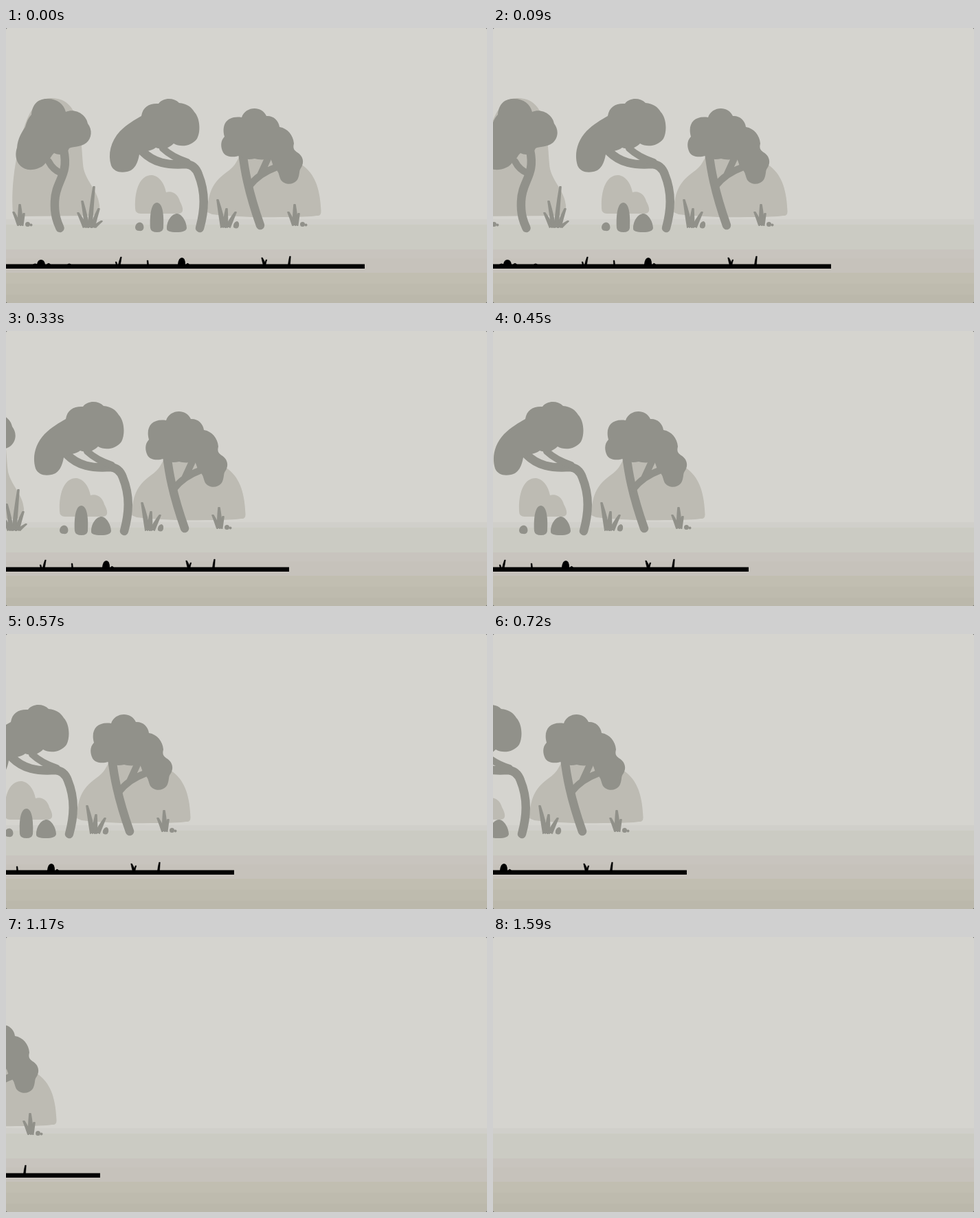
These frames come from a looping animation (700x400 px, 1.86 s). An HTML page with a canvas:

```html
<!DOCTYPE html>
<html lang="en">
<head>
<meta charset="utf-8">
<title>Forest scroll</title>
<style>
html, body { margin: 0; width: 100%; height: 100%; overflow: hidden; background: #444; }
canvas { display: block; width: 700px; height: 400px; border-radius: 2px; }
</style>
</head>
<body>
<canvas width="700" height="400"></canvas>
<script>
const canvas = document.querySelector('canvas');
const ctx = canvas.getContext('2d');
const LOOP = 1860, STEP = 30, STEPS = 53;
const HILL = '#bdbbb3', TREE = '#91918a', GROUND = '#000';

// [top, colour]
const bands = [
  [0, '#d5d4cf'], [278, '#d0cfca'], [286, '#cbcbc3'], [322, '#c8c4be'],
  [335, '#c6c2bb'], [356, '#c1beb1'], [372, '#bebbae'], [388, '#bbb8ab']
];

const hills = new Path2D(`
  M10 268C7 230 14 190 22 160C30 128 42 102 65 102C85 102 96 112 102 130
  C112 165 110 185 113 205C118 225 134 237 136 258Q137 272 126 273L16 274Q10 274 10 268Z
  M188 262C187 235 195 214 212 214C224 215 231 228 233 239C244 236 251 244 253 252
  Q258 261 257 266Q256 270 250 270L196 270Q188 270 188 262Z
  M293 268C294 235 304 222 322 209C332 202 335 196 340 186C360 170 400 180 432 200
  C448 212 457 230 458.500 266Q459 274 452 273Q440 275 400 275C360 276 330 274 300 271Z`);

const crowns = new Path2D(`
  M37 126C38 112 46 103 59 103C73 102 84 110 87 122C102 116 117 127 119 139
  C126 148 125 160 117 167C108 174 97 172 92 175C88 184 78 186 70 182C65 186 66 190 59 194
  C55 203 42 207 32 206C18 203 11 190 16 174C17 160 24 150 28 144C30 136 33 130 37 126Z
  M153 200C148 184 152 165 166 150C176 140 188 133 197 128C199 114 210 109 222 110
  C229 101 244 101 252 109C263 110 270 115 274 122C282 130 284 150 278 161
  C270 172 254 174 244 168C237 175 228 178 218 174C210 180 202 178 194 184
  C192 195 188 207 176 209C166 211 157 209 153 200Z
  M318 158C313 140 322 127 343 130C348 114 372 112 379 128C388 127 397 134 398 144
  C410 146 418 156 419 168C417 176 420 178 424 181C432 186 435 195 429 204
  C426 207 428 216 423 222C417 229 405 228 400 221C397 215 398 211 393 206
  C388 203 388 194 384 189C376 193 366 191 362 190C352 192 345 191 341 185
  C332 189 320 188 316 181C312 173 312 164 318 158Z`);

const trunks = new Path2D(`
  M84 178C92 215 72 222 71 252C70 272 75 283 78.500 291
  M199 180C215 196 235 200 262 198Q275 199 280 213C291 240 289 265 282 291
  M344 180C347 205 352 236 370 287`);
const branches = new Path2D(`
  M62 194Q68 206 80 211M228 175Q242 188 264 195
  M355 229Q368 212 392 203M370 214L381 190`);

const stones = new Path2D(`
  M188 290C189 281 200 280 200.500 290Q200 296 194 295Q188 295 188 290Z
  M210 291C209 272 211 254 220 254C229 255 230 275 229 291Q228 297 220 297Q211 297 210 291Z
  M234 292C234 279 242 270 249 270C257 271 263 283 263 291Q262 297 248 297Q234 297 234 292Z
  M331 290Q330 283 336 281Q340 282 339 288Q337 294 331 290Z`);

const bumps = new Path2D(`
  M45 344Q46 337 51 337Q56 337 57 344ZM39 344Q42 341 46 344ZM59 344Q62 340 65 344Z
  M89 344Q92 341 95 344ZM250 344Q251 334 256 334Q261 334 261 344ZM262 344Q264 340 267 344Z`);

function fill(colour, shape) {
  ctx.fillStyle = colour;
  ctx.fill(shape);
}

function stroke(width, shape) {
  ctx.lineWidth = width;
  ctx.stroke(shape);
}

// Leaf from a base point to a tip, widest in the lower half
function blade(x, y, tipX, tipY, w) {
  const midY = y + (tipY - y) * 0.45;
  const midX = x + (tipX - x) * 0.35;
  ctx.beginPath();
  ctx.moveTo(x - w / 2, y);
  ctx.quadraticCurveTo(midX - w / 2, midY, tipX - 0.8, tipY);
  ctx.lineTo(tipX + 0.8, tipY);
  ctx.quadraticCurveTo(midX + w / 2, midY, x + w / 2, y);
  ctx.fill();
  ctx.stroke();
}

function dot(x, y, r) {
  ctx.beginPath();
  ctx.arc(x, y, r, 0, 7);
  ctx.fill();
}

function smallTuft(x) {
  blade(x - 1, 287, x - 9, 268, 4);
  blade(x + 1, 287, x, 257, 6);
  blade(x + 3, 287, x + 6, 270, 3);
  dot(x + 11.5, 285.500, 3.500);
  dot(x + 16.5, 286.500, 2);
}

function drawScene() {
  fill(HILL, hills);
  ctx.strokeStyle = TREE;
  ctx.lineCap = ctx.lineJoin = 'round';
  stroke(12.5, trunks);
  stroke(10, branches);
  fill(TREE, crowns);
  fill(TREE, stones);

  ctx.lineWidth = 2;
  smallTuft(20);
  smallTuft(420);
  for (const [x, tipX, tipY] of [[115, 105, 269], [118, 111, 252], [122, 128, 231], [126, 135, 263], [128, 139, 281]])
    blade(x, 290, tipX, tipY, 5);
  for (const [x, tipX, tipY] of [[316, 308, 250], [319, 321, 263], [323, 334, 268]])
    blade(x, 290, tipX, tipY, 6);

  ctx.fillStyle = ctx.strokeStyle = GROUND;
  ctx.fillRect(-10, 343.5, 532, 6.5);
  fill(GROUND, bumps);
  ctx.lineWidth = 0.5;
  for (const [x, tipX, tipY, w] of [[161, 160, 340, 2], [165, 167.5, 333, 3], [206.5, 206, 338, 2],
    [376, 372.5, 334, 4], [377, 379, 337, 2], [412, 413.5, 332, 3]])
    blade(x, 344, tipX, tipY, w);
}

// 10 px per step, with one half step near the end
function scrollAt(step) {
  return step * 10 - (step >= 38 ? 5 : 0);
}

function frame(now) {
  const step = Math.floor((now % LOOP) / STEP);
  for (const [top, colour] of bands) {
    ctx.fillStyle = colour;
    ctx.fillRect(0, top, 700, 400 - top);
  }
  if (step < STEPS) {
    ctx.save();
    ctx.translate(-scrollAt(step), 0);
    drawScene();
    ctx.restore();
  }
  requestAnimationFrame(start);
}

let origin;
function start(now) {
  origin ??= now;
  frame(now - origin);
}
requestAnimationFrame(start);
</script>
</body>
</html>
```
